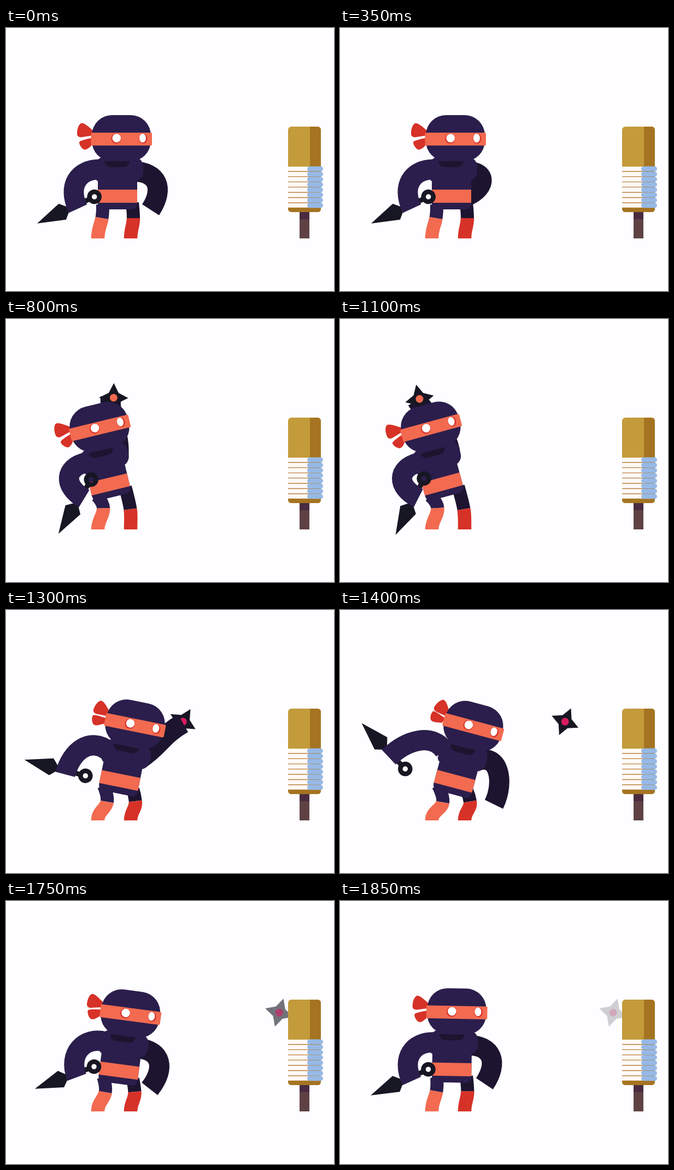
Write an HTML page with a canvas that moves like this. It is 600 by 480 pixels and loops after 1900 ms.

```html
<!DOCTYPE html>
<html lang="en">
<head>
<meta charset="utf-8">
<title>Ninja throwing a star</title>
<style>
  html, body { margin: 0; width: 100%; height: 100%; overflow: hidden; background: #fefdff; }
  canvas { display: block; }
</style>
</head>
<body>
<canvas id="stage" width="600" height="480"></canvas>
<script>
const ctx = document.getElementById('stage').getContext('2d');
const LOOP = 1900, STEP = 50, DEG = Math.PI / 180;
const SUIT = '#2b1e4c', SHADE = '#1d1430', STEEL = '#171623',
      ORANGE = '#f26a50', RED = '#d63228', MAGENTA = '#d81b60';

const easing = {
  linear: k => k,
  in: k => k * k,
  out: k => 1 - (1 - k) ** 2,
  both: k => k * k * (3 - 2 * k)
};

// Rows are [position, easing towards this row, ...values].
function track(rows, pos) {
  let i = 1;
  while (i < rows.length - 1 && pos > rows[i][0]) i++;
  const a = rows[i - 1], b = rows[i];
  const k = Math.min(1, Math.max(0, (pos - a[0]) / (b[0] - a[0])));
  const e = easing[b[1]](k);
  return a.slice(2).map((v, j) => v + (b[j + 2] - v) * e);
}

const LEAN = [
  [0, 'linear', 0], [340, 'linear', 0], [650, 'in', -8.2], [940, 'out', -15.2],
  [1120, 'linear', -15.2], [1350, 'both', 15], [1600, 'linear', 15], [1900, 'both', 0]
];
// By lean: hip shift x, y, then front and back knee as x, y, direction.
const STANCE = [
  [-15.2, 'linear', -12.3, -6.5, 178.5, 345, 86, 226.5, 347, 81],
  [-8.2, 'linear', -5.4, -2.9, 177, 347, 95, 230.5, 347.5, 88],
  [0, 'linear', 0, 0, 175.5, 347, 100, 233, 347, 90],
  [15, 'linear', 1, 5, 188, 351, 100, 238, 349.5, 81]
];
// Arms: reach, reach angle, hand direction, shoulder direction.
const BACK_ARM = [
  [0, 'linear', 77, 65, 123, 0], [200, 'both', 52, 109, 172, 0], [340, 'linear', 52, 109, 172, 0],
  [650, 'in', 79, -11, 43, -47], [940, 'out', 120, -106, -109, -80],
  [1150, 'linear', 120, -106, -109, -80], [1300, 'in', 103, -51, -41, -45],
  [1400, 'linear', 85, 52, 101, -38], [1600, 'out', 78, 66.5, 118, -6], [1900, 'both', 77, 65, 123, 0]
];
const FRONT_ARM = [
  [0, 'linear', 82.4, 119.4, 65, 180], [340, 'linear', 82.4, 119.4, 65, 180],
  [650, 'in', 72.4, 112.3, 54, 180], [940, 'out', 64.5, 105, 42, 180],
  [1150, 'linear', 64.5, 105, 42, 180], [1400, 'both', 103, 158.6, 121.4, 221],
  [1600, 'both', 84, 123.4, 59, 193], [1900, 'both', 82.4, 119.4, 65, 180]
];
// Upper and lower ribbon angles.
const RIBBON = [
  [0, 'linear', 0, 0], [340, 'linear', 0, 0], [650, 'in', -5, -5], [940, 'out', -8, -8],
  [1150, 'linear', -8, -8], [1400, 'both', 18, 33], [1600, 'both', -4, 13], [1900, 'both', 0, 0]
];

const polar = (x, y, r, deg) => [x + r * Math.cos(deg * DEG), y + r * Math.sin(deg * DEG)];

function box(color, x, y, w, h, r = 0) {
  ctx.fillStyle = color;
  ctx.beginPath();
  ctx.roundRect(x, y, w, h, r);
  ctx.fill();
}

function oval(color, x, y, rx, ry = rx) {
  ctx.fillStyle = color;
  ctx.beginPath();
  ctx.ellipse(x, y, rx, ry, 0, 0, 7);
  ctx.fill();
}

function shape(color, d) {
  ctx.fillStyle = color;
  ctx.fill(new Path2D(d));
}

function line(color, width, d) {
  ctx.strokeStyle = color;
  ctx.lineWidth = width;
  ctx.stroke(new Path2D(d));
}

function placed(x, y, deg, draw) {
  ctx.save();
  ctx.translate(x, y);
  ctx.rotate(deg * DEG);
  draw();
  ctx.restore();
}

function star(hub) {
  ctx.fillStyle = STEEL;
  ctx.beginPath();
  for (let i = 0; i < 8; i++) ctx.lineTo(...polar(0, 0, i % 2 ? 12.7 : 26.7, i * 45));
  ctx.fill();
  oval(hub, 0, 0, 7);
}

function kunai() {
  shape(STEEL, 'M-79-7L-28-23L-12-7L-28 9Z');
  line(STEEL, 9, 'M-14-7H26');
  ctx.strokeStyle = STEEL;
  ctx.lineWidth = 8.5;
  ctx.beginPath();
  ctx.arc(36.5, -7, 9, 0, 7);
  ctx.stroke();
}

function arm(color, x, y, [reach, angle, hand, start], bend) {
  const end = polar(x, y, reach, angle);
  const c1 = polar(x, y, bend, start), c2 = polar(...end, -46, hand);
  return { end, hand, draw: () => line(color, 37, `M${x} ${y}C${c1} ${c2} ${end}`) };
}

function leg(upper, lower, hip, x, y, dir, foot) {
  line(upper, 24, `M${hip}Q${polar(x, y, -10, dir)} ${x} ${y}`);
  line(lower, 24.5, `M${x} ${y}C${polar(x, y, 14, dir)} ${foot} 367 ${foot} 384`);
}

function post() {
  box('#4a2b40', 537, 330, 18, 19);
  box('#5f4144', 537, 349, 18, 35);
  box('#c39b3b', 516, 180, 60, 156, 6);
  box('#a57422', 556, 180, 20, 156, [0, 6, 6, 0]);
  box('#a57422', 516, 326, 60, 10, [0, 0, 6, 6]);
  box('#b9803c', 516, 253, 40, 74);
  for (let i = 0; i < 8; i++) {
    const y = 253 + i * 9.53;
    box('#fff9f7', 516, y, 40, 8.1);
    box('#97b9e6', 551, y - 0.4, 29, 9, 4.5);
  }
}

function flyingStar(t) {
  if (t < 1300) return;
  const flight = Math.min(t, 1500) - 1400;
  ctx.globalAlpha = Math.min(1, (LOOP - t) / 250);
  placed(411.7 + 0.88 * flight, 203.8, 24 + 0.83 * flight, () => star(MAGENTA));
  ctx.globalAlpha = 1;
}

function ribbon(angle, d) {
  placed(158, 199, angle, () => {
    ctx.translate(-158, -199);
    shape(RED, d);
  });
}

function head(t) {
  const [upper, lower] = track(RIBBON, t);
  ribbon(upper, 'M160 188C149 178 141 172 137 174C131 178 130 188 130 193C130 199 136 200 140 199L160 196Z');
  ribbon(lower, 'M160 200C148 203 134 205 134 209C134 214 140 222 144 222C150 222 154 216 160 211Z');
  box(SUIT, 157, 159, 108, 84, 37);
  box(SHADE, 180, 243, 46, 11, [0, 0, 22, 22]);
  box(ORANGE, 155.5, 191, 111.5, 23.5, 2);
  oval(RED, 201.5, 201.8, 9);
  oval('#fff', 202.3, 201, 7.8);
  oval(RED, 251, 201.8, 7.5, 9);
  oval('#fff', 250, 201, 6, 8);
}

function ninja(t) {
  const [lean] = track(LEAN, t);
  const [dx, dy, ...knees] = track(STANCE, lean);
  const inBody = draw => placed(204 + dx, 325 + dy, lean, () => {
    ctx.translate(-204, -325);
    draw();
  });
  const hip = (x, y) => {
    const c = Math.cos(lean * DEG), s = Math.sin(lean * DEG);
    return [204 + dx + x * c - y * s, 325 + dy + x * s + y * c];
  };

  inBody(() => {
    const back = arm(SHADE, 232, 262, track(BACK_ARM, t), 46);
    back.draw();
    if (t >= 400 && t < 1300) {
      const turn = Math.min(21, -27 + Math.max(0, t - 650) * 0.166);
      placed(...back.end, back.hand, () => placed(-1.5, 5.5, turn, () => star(ORANGE)));
    }
  });

  leg(SHADE, RED, hip(27, -6), ...knees.slice(3), 228);
  leg(SUIT, ORANGE, hip(-27, -3), ...knees.slice(0, 3), 168);

  inBody(() => {
    box(SUIT, 163, 235, 88, 45, [18, 18, 18, 8]);
    box(SUIT, 168, 250, 72, 81, [0, 0, 10, 10]);
    box(ORANGE, 168, 295, 72, 24);
    const front = arm(SUIT, 172, 258, track(FRONT_ARM, t), 40);
    placed(...front.end, front.hand - 90, kunai);
    front.draw();
    head(t);
  });
}

function frame(now) {
  const t = Math.floor(now % LOOP / STEP) * STEP;
  ctx.fillStyle = '#fefdff';
  ctx.fillRect(0, 0, 600, 480);
  flyingStar(t);
  post();
  ninja(t);
  requestAnimationFrame(frame);
}
requestAnimationFrame(frame);
</script>
</body>
</html>
```
